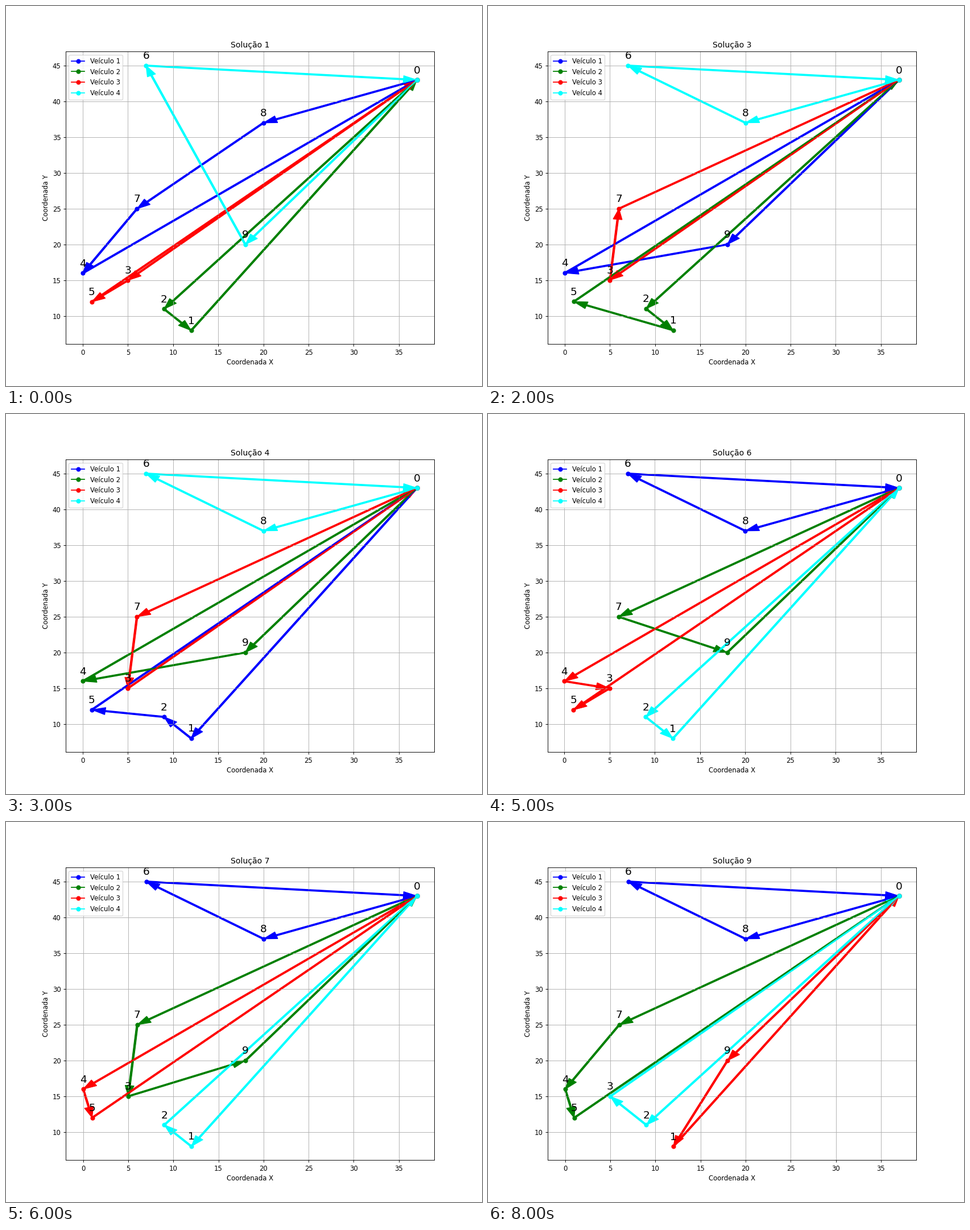
Animation, 837 px wide and 669 px high, one loop 9 s. Source, as a matplotlib script:

```python
import matplotlib.pyplot as plt
from matplotlib.animation import FuncAnimation

W, H, DPI = 837, 669, 83.7

# Depot is node 0, customers are 1 to 9
NODES = [(37, 43), (12, 8), (9, 11), (5, 15), (0, 16),
         (1, 12), (7, 45), (6, 25), (20, 37), (18, 20)]
COLORS = ["blue", "green", "red", "cyan"]

# One string per solution, one group of customers per vehicle
SOLUTIONS = [
    "874 21 35 96",
    "672 89 45 13",
    "94 215 37 86",
    "125 94 73 86",
    "123 95 74 86",
    "86 79 435 21",
    "86 739 45 12",
    "68 74 953 12",
    "86 745 91 23",
]

plt.rcParams["font.family"] = "DejaVu Sans"
# The small excess keeps the pixel size from being truncated
fig, ax = plt.subplots(figsize=((W + 0.001) / DPI, (H + 0.001) / DPI), dpi=DPI)


def draw_route(stops, color, label):
    points = [NODES[int(s)] for s in "0" + stops + "0"]
    xs, ys = zip(*points)
    ax.plot(xs, ys, marker="o", color=color, label=label)
    for (x0, y0), (x1, y1) in zip(points, points[1:]):
        ax.arrow(x0, y0, x1 - x0, y1 - y0, width=0.2, head_width=1,
                 head_length=1.5, length_includes_head=True,
                 fc=color, ec=color)


def draw(i):
    ax.clear()
    for k, stops in enumerate(SOLUTIONS[i].split()):
        draw_route(stops, COLORS[k], f"Veículo {k + 1}")
    for n, xy in enumerate(NODES):
        ax.annotate(str(n), xy, xytext=(0, 10), textcoords="offset points",
                    ha="center", fontsize=16)
    ax.set_title(f"Solução {i + 1}")
    ax.set_xlabel("Coordenada X")
    ax.set_ylabel("Coordenada Y")
    ax.legend(loc="upper left")
    ax.grid(True)
    return []


anim = FuncAnimation(fig, draw, frames=len(SOLUTIONS), init_func=lambda: [],
                     interval=1000, repeat=True, repeat_delay=0)
plt.show()
```
